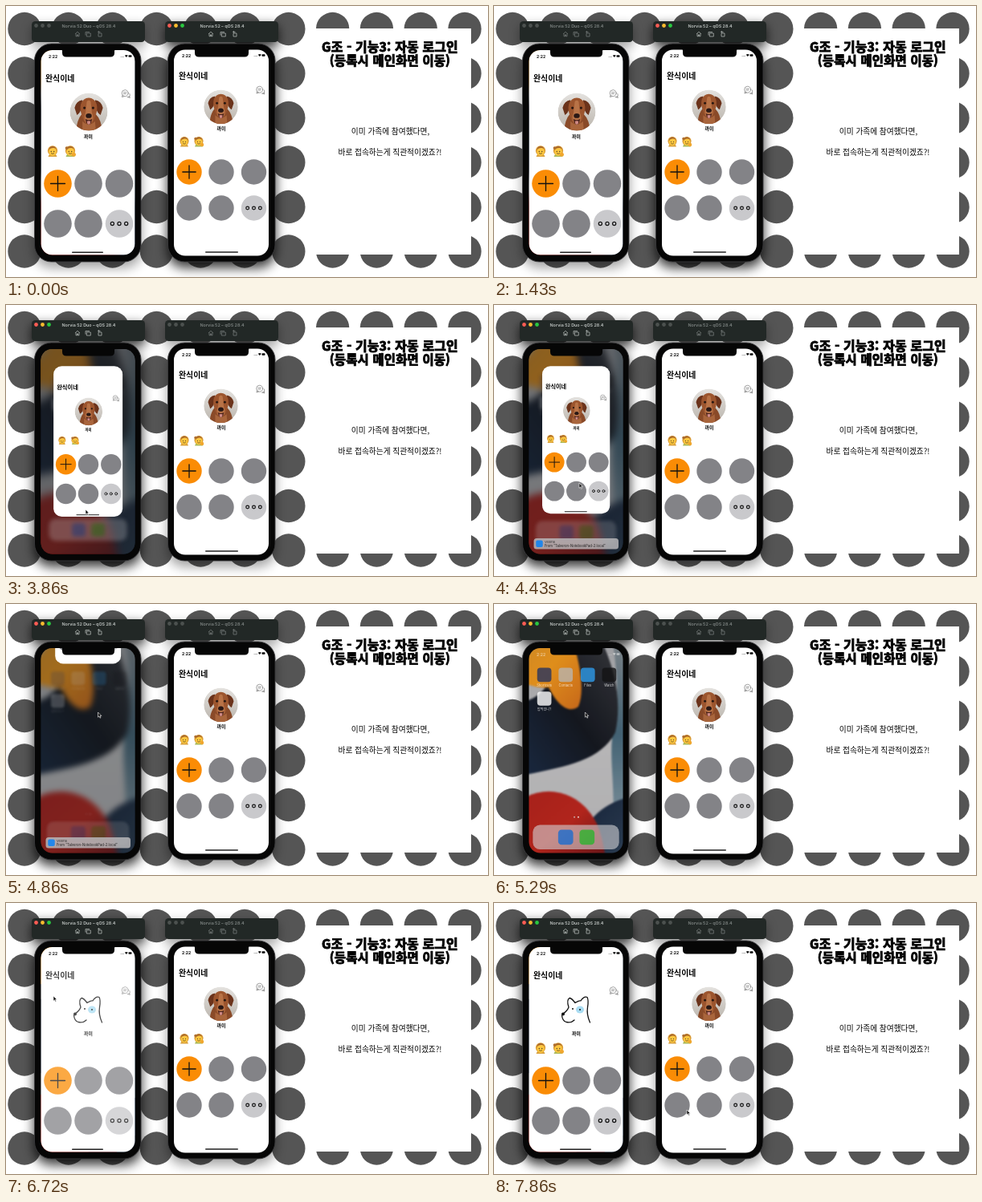
These frames come from a looping animation (600 px wide and 338 px high, 8 s). An HTML page:

```html
<!DOCTYPE html>
<html lang="ko">
<head>
<meta charset="utf-8">
<title>자동 로그인</title>
<style>
html, body { margin: 0; width: 100%; height: 100%; overflow: hidden; background: #fff; }
svg { display: block; width: 600px; height: 338px; }
text { font-family: "Noto Sans CJK KR", "Noto Sans CJK", "Noto Sans CJK JP", sans-serif; }
.ui { font-family: Inter, "Noto Sans CJK KR", sans-serif; }
.mid { text-anchor: middle; }
.line { fill: none; stroke: #111; stroke-linecap: round; stroke-linejoin: round; }
.icon { fill: none; stroke: currentColor; stroke-width: .7; }
</style>
</head>
<body>
<svg id="stage" viewBox="0 0 600 338"></svg>
<script>
const LOOP = 8000, FPS = 7;
const $ = id => document.getElementById(id);
const CENTER = { x: 102.5, y: 182.5 };

const LEFT = {
  id: 'left', bar: 32, title: 'Norvia 52 Duo – qOS 28.4', icons: [89, 102, 117],
  body: [35.5, 47, 132.5, 272], screen: [43.5, 55, 117, 255.5], notch: [70, 135, 63.5],
  clock: [53, 65], signal: [143, 62.5], home: [82, 121, 307.3],
  name: [49, 94.3], chat: [149, 109.5], photo: [103, 132, 23.5], pet: [102.5, 164.5],
  people: [58, 80, 181.5], cols: [64.5, 102.5, 141], rows: [221.5, 271.5], r: 17.3
};
const RIGHT = {
  id: 'right', bar: 198, title: 'Norvia 52 – qOS 28.4', icons: [255, 270, 285],
  body: [201.5, 47, 133.5, 272], screen: [209, 54.5, 118, 257], notch: [235, 302, 63.5],
  clock: [219, 64], signal: [309, 61.5], home: [248, 289, 307],
  name: [215, 91.4], chat: [316.5, 105], photo: [267.5, 125.7, 21.3], pet: [268, 155],
  people: [222, 240, 169.5], cols: [228, 268, 308.5], rows: [207, 252], r: 15.7
};

const rect = ([x, y, w, h], r, attrs) =>
  `<rect x="${x}" y="${y}" width="${w}" height="${h}" rx="${r}" ${attrs}/>`;
const circle = (x, y, r, attrs) => `<circle cx="${x}" cy="${y}" r="${r}" ${attrs}/>`;
const text = (x, y, size, str, attrs = '') =>
  `<text x="${x}" y="${y}" font-size="${size}" ${attrs}>${str}</text>`;
const path = (d, attrs) => `<path d="${d}" ${attrs}/>`;
const square = (x, y, size, fill) =>
  rect([x - size / 2, y - size / 2, size, size], size * .23, `fill="${fill}"`);

function pattern() {
  let s = '';
  for (let row = 0; row < 6; row++)
    for (let col = 0; col < 11; col++)
      s += circle(23 + col * 54.8, 28.5 + row * 55.5, 20.7, 'fill="#555"');
  return s;
}

function panel() {
  const head = 'class="mid" font-weight="900" stroke="#000" stroke-width=".9" letter-spacing=".2"';
  const note = 'class="mid" font-weight="500"';
  return rect([376, 28, 203, 282], 0, 'fill="#fff"') +
    text(478, 57, 15.9, 'G조 - 기능3: 자동 로그인', head) +
    text(478, 74.3, 15.4, '(등록시 메인화면 이동)', head) +
    text(478.5, 160, 9.7, '이미 가족에 참여했다면,', note) +
    text(478, 185.5, 9.7, '바로 접속하는게 직관적이겠죠?!', note);
}

function toolbar(p) {
  const [a, b, c] = p.icons;
  const lights = [0, 1, 2].map(i => circle(p.bar + 5.5 + i * 8, 24.5, 2.4, 'class="light"')).join('');
  return `<g id="${p.id}Bar">` + rect([p.bar, 19, 141, 26], 4.5, 'fill="#222826"') + lights +
    text(p.bar + 71, 27, 5.4, p.title, 'class="ui mid" font-weight="600" fill="currentColor"') +
    path(`M${a - 3} 35l3-2.8 3 2.8M${a - 2} 34.5v3.3h1.5v-2h1v2h1.5v-3.3` +
      `M${b - 3} 36.5v-4h5M${b - 1.7} 34h5v4h-5z` +
      `M${c - 2} 34h4v4h-4zM${c - 1} 31.2l-1.5 1.2 1.5 1.2M${c - 2.5} 32.4h3`, 'class="icon"') + '</g>';
}

const shadow = p => `<g id="${p.id}Shadow" filter="url(#soft)">` +
  rect([p.bar, 24, 141, 28], 5, '') + rect([p.body[0] - 1, 56, p.body[2] + 2, 271], 22, '') + '</g>';

const body = p => rect(p.body, 21, 'fill="#060606" stroke="#3c3c3e" stroke-width=".9"');

function notch(p) {
  const [l, r, b] = p.notch, top = p.screen[1] - 1;
  return path(`M${l - 2} ${top}q2 0 2 2V${b - 5}q0 5 5 5H${r - 5}q5 0 5-5V${top + 2}q0-2 2-2z`, 'fill="#060606"');
}

function status(p) {
  const [x, y] = p.signal;
  return `<g id="${p.id}Status" fill="currentColor">` +
    text(...p.clock, 5, '2:22', 'class="ui" font-weight="700"') +
    [0, 1, 2, 3].map(i => circle(x + i * 1.1, y + .8, .35, '')).join('') +
    path(`M${x + 4.8} ${y - .8}q2-1.6 4 0l-2 2.2z`, '') +
    rect([x + 9.5, y - 1.2, 4, 2.4], .6, '') + '</g>';
}

const indicator = (p, id) => {
  const [a, b, y] = p.home;
  return rect([a, y - .7, b - a, 1.4], .7, `id="${id}" fill="#222"`);
};

// Portrait in a circle, drawn on a radius of 24
const photo = ([x, y, r]) => `<g transform="translate(${x} ${y}) scale(${r / 24})"><g clip-path="url(#round)">` +
  circle(0, 0, 24, 'fill="url(#wall)"') +
  path('M-16 24Q-15 10-9 3H9Q16 10 17 24Z', 'fill="#8a4a28"') +
  path('M-8 12Q0 20 8 12L9 24H-8Z', 'fill="#a9653c"') +
  path('M-8-15Q-16-14-18-5L-15 4Q-11 2-9-5ZM8-15Q16-14 18-5L15 4Q11 2 9-5Z', 'fill="#6b331b"') +
  path('M-10-10Q-7-18 0-18T10-10Q12-2 8 6 6 15 0 16-6 15-8 6-12-2-10-10Z', 'fill="#9c552e"') +
  path('M-2.5-13Q0-16 2.5-13L4 1Q7 8 4 13 0 16-4 13-7 8-4 1Z', 'fill="#b87347"') +
  path('M-4.5 9Q0 12 4.5 9L3 14Q0 18-3 14Z', 'fill="#4e241c"') +
  path('M-2.2 12Q0 11 2.2 12L1.8 15Q0 17-1.8 15Z', 'fill="#cf8a86"') +
  '<ellipse cx="0" cy="5" rx="3.8" ry="2.9" fill="#2a1815"/>' +
  circle(-5.5, -5, 1.6, 'fill="#261610"') + circle(5.5, -5, 1.6, 'fill="#261610"') + '</g></g>';

const doodle = () => '<g id="doodle">' +
  '<ellipse cx="107" cy="133" rx="5" ry="4.6" fill="#a9dcf2"/>' +
  path('M86 138Q91 135 93 130 90 121 94 118.5 97 119 101 124.5 106 121 108 122 112 116 116 117.5 118 121 116.5 130 115 139 119.5 149' +
    'M84.5 140Q85 147 90 148.5 96 150 100 146', 'class="line" stroke-width="1.3"') +
  circle(86, 138.5, 2, 'fill="#111"') + circle(98, 132, 1, 'fill="#111"') +
  circle(107, 133, 1, 'fill="#111"') + '</g>';

const person = (x, y, s, woman) => `<g transform="translate(${x} ${y}) scale(${s})">` +
  circle(0, -1, 5.6, 'fill="#d99a35"') +
  path('M-5 6Q-4 2 0 2T5 6Z', `fill="${woman ? '#a9b85a' : '#d9a13d'}"`) +
  '<ellipse cx="0" cy="0" rx="4.3" ry="4.8" fill="#fcc63f"/>' +
  path('M-4.2-1Q-3-4 1-4 4-4 4.2-1 4-6 0-6-4-6-4.2-1Z', 'fill="#a8672a"') +
  circle(-1.6, 0, .6, 'fill="#432"') + circle(1.6, 0, .6, 'fill="#432"') +
  path('M-1.5 2.2Q0 3.3 1.5 2.2', 'class="line" stroke-width=".5"') +
  (woman ? circle(4, 3.5, 2.3, 'fill="#f0a72f"') + circle(-4, -4, 1.8, 'fill="#b0702f"') : '') + '</g>';

function buttons(p) {
  let s = '';
  p.rows.forEach((y, j) => p.cols.forEach((x, i) => {
    const n = j * 3 + i;
    s += circle(x, y, p.r, `fill="${n === 0 ? '#fa8c05' : n === 5 ? '#c9c9cc' : '#838387'}"`);
  }));
  const [x, , z] = p.cols, [y, w] = p.rows, k = p.r * .52;
  return s + path(`M${x - k} ${y}h${2 * k}M${x} ${y - k}v${2 * k}`, 'class="line" stroke-width="1.3"') +
    [-1, 0, 1].map(i => circle(z + i * p.r * .5, w, p.r * .12, 'class="line" stroke-width="1.2"')).join('');
}

function app(p) {
  const [x, y] = p.chat, [a, b, h] = p.people, left = p === LEFT, size = p.r / 15.8;
  return rect(p.screen, 14, 'fill="#fff"') + `<g id="${p.id}Content">` +
    text(...p.name, 9.9, '완식이네', 'font-weight="700"') +
    `<g class="line" style="stroke:#777" stroke-width=".7">` + circle(x - .8, y - .8, 4, '') +
    path(`M${x - 4} ${y + 2}l-.6 2 2.4-.7M${x + 2} ${y + 4.3}q3 .4 3.3-2.3l-.4-2M${x + 3} ${y + 4}l2.3 1-.6-2M${x - 2.6} ${y - 1.8}h3.6M${x - 2.6} ${y}h3`, '') + '</g>' +
    `<g id="${p.id}Photo">${photo(p.photo)}</g>` + (left ? doodle() : '') +
    text(...p.pet, 5.9, '까미', 'class="mid" font-weight="700"') +
    `<g id="${p.id}People">${person(a, h, size, false)}${person(b, h, size, true)}</g>` +
    buttons(p) + '</g>' + indicator(p, p.id + 'Home');
}

const wallpaper = () => '<g id="paper">' +
  rect([24, 35, 156, 296], 0, 'fill="url(#grey)"') +
  path('M180 35V290H146C154 230 140 190 150 150Q158 110 146 35Z', 'fill="url(#teal)"') +
  path('M88 35H128C150 75 160 120 151 160C132 198 82 204 24 216V122C60 126 80 90 88 35Z', 'fill="url(#navy)"') +
  path('M24 62Q46 76 54 35H94C106 66 114 108 105 128C92 138 78 124 68 104Q52 106 24 94Z', 'fill="url(#orange)"') +
  path('M100 331C104 262 146 244 180 238V331Z', 'fill="url(#blue)"') +
  path('M24 252C58 220 108 232 128 274Q138 298 140 331H24Z', 'fill="url(#red)"') + '</g>';

function homeIcons() {
  const xs = [62, 89, 117, 144];
  const apps = [['Shortcuts', '#27345f'], ['Contacts', '#b9b5ae'], ['Files', '#2f9bea'], ['Watch', '#131315'], ['밥먹었니?', '#fff']];
  return '<g id="icons">' + apps.map(([label, fill], i) => {
    const x = xs[i % 4], y = i < 4 ? 87 : 117;
    return square(x, y, 18, fill) + text(x, y + 15, 4.2, label, 'class="ui mid" fill="#fff"');
  }).join('') + circle(100, 267, 1, 'fill="#ccc"') + circle(105, 267, 1, 'fill="#fff"') +
    rect([47.5, 277, 109, 31], 9, 'fill="#d3d3d7" fill-opacity=".75"') +
    square(89, 292.5, 19, '#2387ea') + square(116, 292.5, 19, '#37cf4a') + '</g>';
}

const handoff = () => '<g id="handoff">' +
  rect([49.5, 291, 105.5, 13.5], 3.5, 'fill="#b9b8ba" fill-opacity=".85"') + square(56.5, 297.7, 8.5, '#2387ea') +
  text(63, 296.8, 4, 'Velona', 'class="ui" fill="#333"') +
  text(63, 301.8, 4.2, 'From “Talveron-NotebookPad-2.local”', 'class="ui" fill="#222"') + '</g>';

const gradient = (id, dir, ...colors) => `<linearGradient id="${id}" ${dir}>` +
  colors.map((c, i) => `<stop offset="${i / (colors.length - 1)}" stop-color="${c}"/>`).join('') + '</linearGradient>';

const defs = `<defs>
  <filter id="soft" x="-20%" y="-20%" width="140%" height="140%"><feGaussianBlur stdDeviation="7"/></filter>
  <clipPath id="round"><circle r="24"/></clipPath>
  <clipPath id="screen">${rect(LEFT.screen, 14, '')}</clipPath>` +
  gradient('wall', 'x2="0" y2="1"', '#e4e2df', '#bbb5ad') +
  gradient('grey', 'x2="0" y2="1"', '#a9aaae', '#c6c5c6', '#bdbcc0') +
  gradient('orange', 'y2="1"', '#d9922a', '#f39a1c', '#d8701a') +
  gradient('navy', 'x1="1" x2="0" y2="1"', '#3a3b40', '#14171f', '#1a2c48') +
  gradient('teal', 'x2="0" y2="1"', '#8b9095', '#47697c', '#8fa3ae') +
  gradient('red', 'y2="1"', '#b3211c', '#c0261d', '#5e1218') +
  gradient('blue', 'x2="1" y2="1"', '#142038', '#33485f') + '</defs>';

$('stage').innerHTML = defs + pattern() + panel() +
  shadow(LEFT) + shadow(RIGHT) + toolbar(LEFT) + toolbar(RIGHT) +
  body(LEFT) + '<g clip-path="url(#screen)">' + wallpaper() +
  rect(LEFT.screen, 0, 'id="dim" fill="#161a1e"') + homeIcons() + handoff() +
  `<g id="card">${app(LEFT)}</g></g>` + notch(LEFT) + status(LEFT) +
  body(RIGHT) + app(RIGHT) + notch(RIGHT) + status(RIGHT) +
  `<g id="cursor">${path('M0 0V6.2L1.5 4.9 2.5 7.2 3.5 6.8 2.5 4.5H4.4Z', 'fill="#111" stroke="#fff" stroke-width=".6"')}</g>`;

// Each row: time, then values
const CURSOR = [[2290, 125, 345], [2430, 116, 333], [2714, 101.5, 316.5], [3430, 101.5, 312],
  [3571, 101, 306], [3714, 100, 276], [3857, 99, 255], [4290, 103, 235], [4430, 106, 222], [4714, 113, 155],
  [4857, 114.5, 135], [5430, 113, 135], [6000, 94, 88], [6200, 59, 116], [7720, 59, 116], [7850, 240, 258]];
const CARD = [[3571, 102.5, 182.5, 1, 1], [3714, 102.5, 176, .85, 1], [3857, 102.5, 170, .735, 1], [4430, 102.5, 168, .72, 1],
  [4714, 102.5, 85, .71, 1], [4857, 102.5, -15, .7, 1], [5000, 102.5, -120, .7, 1], [5100, 62, 117, .1, 0],
  [6150, 62, 117, .1, 0], [6286, 73, 135, .35, .8], [6571, 102.5, 182.5, 1, 1]];
const DIM = [[3857, .55], [4857, .36], [5430, 0]];
const BLUR = [[3857, 6], [4857, 3.5], [5430, 0]];
const ICONS = [[3857, .35], [4857, .2], [5430, 1]];
const ZOOM = [[3857, .89], [4857, .94], [5430, 1]];
const HANDOFF = [[4143, 0], [4430, 1], [4857, 1], [5143, 0]];
const STATUS = [[3571, 1], [3714, 0], [5143, 0], [5430, 1]];
const CONTENT = [[6571, 0], [6714, .75], [7000, 1]];
const PEOPLE = [[7143, 0], [7286, 1]];

function at(track, t) {
  const i = track.findIndex(row => row[0] > t);
  if (i === 0) return track[0].slice(1);
  if (i < 0) return track[track.length - 1].slice(1);
  const a = track[i - 1], b = track[i], k = (t - a[0]) / (b[0] - a[0]);
  return a.slice(1).map((v, n) => v + (b[n + 1] - v) * k);
}

const fade = (id, v) => { $(id).style.opacity = v; };
const scaleAt = (id, x, y, s) =>
  $(id).setAttribute('transform', `translate(${x} ${y}) scale(${s}) translate(${-CENTER.x} ${-CENTER.y})`);

function focus(p, on) {
  const bar = $(p.id + 'Bar');
  bar.style.color = on ? '#bfc4c2' : '#7d8381';
  bar.querySelectorAll('.light').forEach((el, i) =>
    el.setAttribute('fill', on ? ['#ff5c54', '#fdbc2e', '#29c840'][i] : '#4c514f'));
  fade(p.id + 'Shadow', on ? .75 : .35);
}

function draw(t) {
  const leftActive = t >= 2990, reopened = t >= 6000;
  focus(LEFT, leftActive);
  focus(RIGHT, !leftActive);

  const [cx, cy, scale, alpha] = at(CARD, t);
  scaleAt('card', cx, cy, scale);
  fade('card', alpha);
  fade('leftContent', reopened ? at(CONTENT, t)[0] : 1);
  fade('leftPeople', reopened ? at(PEOPLE, t)[0] : 1);
  fade('leftPhoto', reopened ? 0 : 1);
  fade('doodle', reopened ? 1 : 0);
  fade('leftHome', t > 4500 && t < 6500 ? 0 : 1);

  const [blur] = at(BLUR, t);
  $('paper').style.filter = blur ? `blur(${blur}px)` : 'none';
  $('icons').style.filter = blur ? `blur(${blur / 2}px)` : 'none';
  scaleAt('icons', CENTER.x, CENTER.y, at(ZOOM, t)[0]);
  fade('dim', at(DIM, t)[0]);
  fade('icons', at(ICONS, t)[0]);
  fade('handoff', at(HANDOFF, t)[0]);
  fade('leftStatus', at(STATUS, t)[0]);
  $('leftStatus').style.color = t > 3650 && t < 6500 ? '#fff' : '#111';

  const [x, y] = at(CURSOR, t);
  $('cursor').setAttribute('transform', `translate(${x} ${y})`);
}

const start = performance.now();
function tick() {
  const t = (performance.now() - start) % LOOP;
  draw(Math.floor((t + 3) * FPS / 1000) * 1000 / FPS);
  requestAnimationFrame(tick);
}
tick();
</script>
</body>
</html>
```
